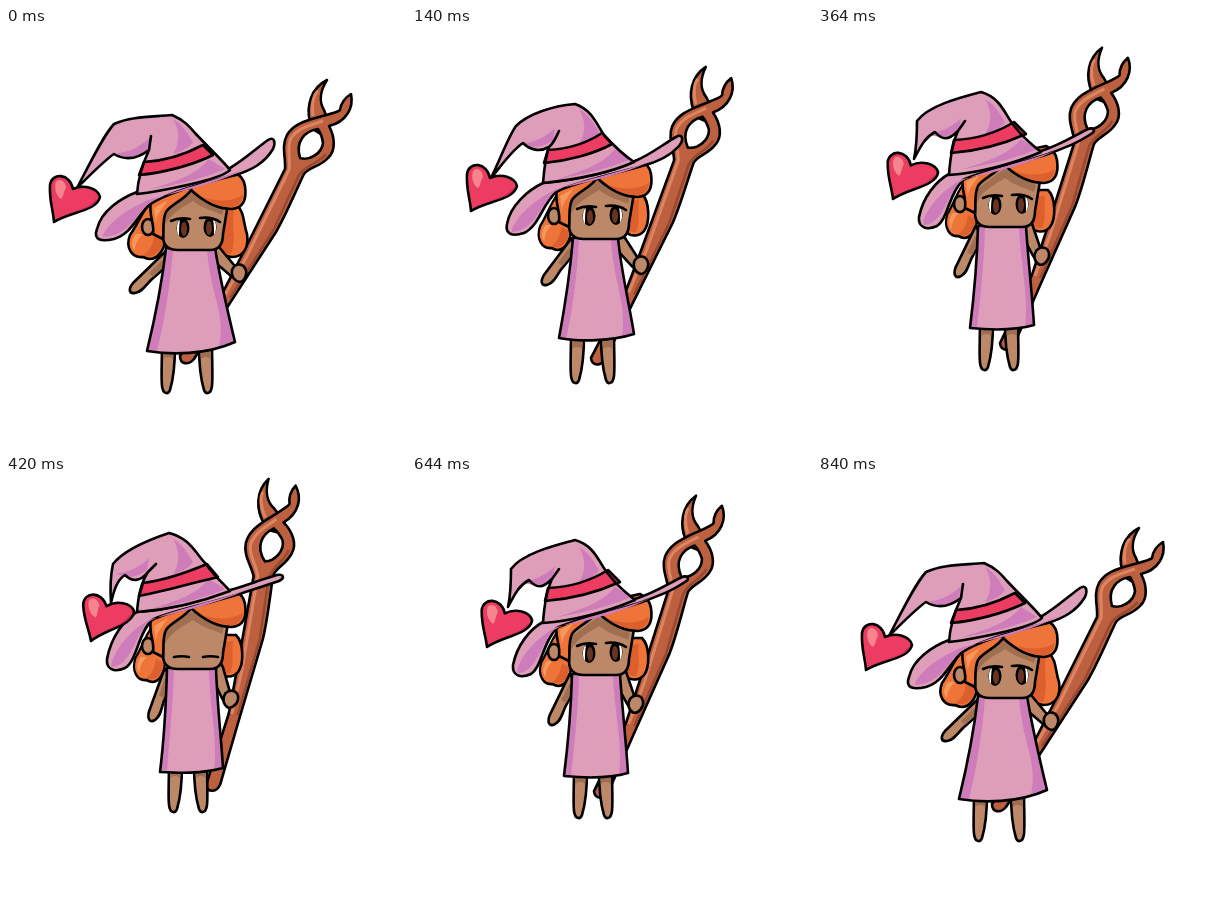
Animation, 400 px wide and 420 px high, one loop 0.98 s. Source, as an HTML page without scripts:

```html
<!DOCTYPE html>
<html lang="en">
<head>
<meta charset="utf-8">
<title>Little witch</title>
<style>
html, body { margin: 0; width: 100%; height: 100%; overflow: hidden; background: #fff; }
svg { display: block; width: 400px; height: 420px; }
.ink { stroke: #000; stroke-width: 2.6; stroke-linejoin: round; stroke-linecap: round; }
.line { fill: none; }
.skin { fill: #bd8868; }
.skin-dark { fill: #a06e50; }
.hair { fill: #ef7439; }
.hair-lit { fill: #f6975b; }
.hair-dark { fill: #dc5f2d; }
.cloth { fill: #de9eb9; }
.cloth-dark { fill: #cf7cba; }
.red { fill: #ec3c62; }
.wood { fill: #bd6040; }

.pose { visibility: hidden; animation: .98s step-end infinite; }
.low { animation-name: low; }
.mid { animation-name: mid; }
.high { animation-name: high; }
.top { animation-name: top; }
@keyframes low { 0%, 85.7142% { visibility: visible } 14.2857% { visibility: hidden } }
@keyframes mid { 0%, 28.5714%, 85.7142% { visibility: hidden } 14.2857%, 71.4285% { visibility: visible } }
@keyframes high { 0%, 42.8571%, 71.4285% { visibility: hidden } 28.5714%, 57.1428% { visibility: visible } }
@keyframes top { 0%, 57.1428% { visibility: hidden } 42.8571% { visibility: visible } }
</style>
</head>
<body>
<svg viewBox="0 0 400 420">
<defs>
  <!-- staff: origin at the eye of the fork -->
  <g id="staff" transform="translate(-308 -115)">
    <path class="ink wood" d="M304 94C300 78 305 60 321 52C314 63 313 74 318 82L324 98L318 108L308 102Z"/>
    <path class="ink wood" fill-rule="evenodd" d="M345 66C348 80 340 94 323 98C329 109 330 123 322 130C314 139 303 139 298 146C291 160 281 185 270 204L222 278L188 331C182 338 174 336 174 328L216 266L237 225L279 141C280 130 275 118 281 107C287 97 297 94 306 91C319 87 331 85 334 82C335 75 340 69 345 66ZM312 101C299 103 289 113 294 130C304 133 316 125 317 115C316 108 314 104 312 101Z"/>
    <path class="line" stroke="#dc8562" stroke-width="3" d="M219 267L241 228L283 142C285 129 280 120 285 110C292 100 302 98 317 93M307 88C305 76 308 66 312 63"/>
    <path class="line" stroke="#984831" stroke-width="2.5" d="M224 270L267 203L293 147C300 137 312 136 320 126"/>
  </g>

  <g id="leg">
    <path class="ink skin" d="M-4 -48C-4 -32 -5 -16 -4 -7C-3 1 2 2 4 -3C8 -16 9 -30 9 -48Z"/>
    <path class="skin-dark" d="M-3 -44H8L7 -34C3 -37 0 -36 -3 -34Z"/>
  </g>
  <!-- arms: origin at the hand -->
  <g id="arm-left">
    <path class="ink skin" d="M33 -39L0 -7C-5 -1 -4 4 2 3C9 2 12 -4 18 -10L36 -26Z"/>
    <path class="skin-dark" d="M29 -30L16 -17L20 -13L33 -25Z"/>
  </g>
  <g id="arm-right">
    <path class="ink skin" d="M-34 -36L-20 -25L-5 -7L-1 8L-8 4L-22 -8L-34 -22Z"/>
    <path class="ink skin" d="M-7 -2C-4 -9 3 -9 6 -4C9 1 6 9 1 10C-5 9 -8 4 -7 -2Z"/>
  </g>

  <g id="hair-left">
    <path class="ink hair" d="M145 174C135 185 131 198 124 207C119 220 126 230 137 229C146 234 154 229 158 218L162 180Z"/>
    <path class="hair-dark" d="M137 227C144 223 147 216 148 208L157 212C155 226 146 231 137 227Z"/>
    <path class="hair-lit" d="M130 206C125 213 125 219 129 222C129 215 133 210 137 206Z"/>
  </g>
  <g id="hair-right">
    <path class="ink hair" d="M230 176C239 184 237 195 241 206C243 219 238 229 226 229C218 229 214 224 212 218L216 178Z"/>
    <path class="hair-dark" d="M218 184L228 182C225 196 231 212 225 226C218 226 215 220 214 216Z"/>
  </g>
  <g id="locks">
    <path class="ink hair" d="M230 176C238 184 238 205 232 213C226 220 217 218 213 213L216 176Z"/>
    <path class="hair-dark" d="M218 183L227 182C225 193 229 204 224 214C218 215 215 211 214 207Z"/>
  </g>

  <g id="face">
    <ellipse class="ink skin" cx="142" cy="199" rx="6" ry="8"/>
    <path class="ink skin" d="M157 180V208C157 217 162 222 172 222H204C213 222 217 216 217 206L222 176L186 160Z"/>
    <path class="skin-dark" d="M186 164L159 184V197C165 184 180 178 187 173C197 181 211 184 216 187L218 180Z"/>
  </g>
  <g id="fringe">
    <path class="ink hair" d="M187 160C179 172 165 176 160 184C156 192 158 203 157 211L147 206C149 195 142 188 145 172L165 160Z"/>
    <path class="hair-lit" d="M148 180L162 172L153 185C150 190 150 194 150 196Z"/>
    <path class="ink hair" d="M185 162C198 174 212 181 226 181C237 180 241 172 239 158C238 151 234 147 228 144L186 153Z"/>
    <path class="hair-dark" d="M196 169C210 174 226 174 237 167C236 176 230 180 222 179C212 178 204 175 196 169Z"/>
  </g>
  <g id="eye">
    <ellipse cx="0" cy="0" rx="6.5" ry="10"/>
    <path fill="#fff" d="M-5 -6C-7 0 -6 5 -4 8C-4 3 -4 -3 -3 -8Z"/>
    <ellipse cx="1" cy="1" rx="3" ry="7" fill="#693522"/>
  </g>
  <g id="eyes">
    <use href="#eye" x="177" y="200"/>
    <use href="#eye" transform="translate(204 199) scale(-1 1)"/>
    <path class="ink line" stroke-width="2" d="M165 193C171 190 178 190 184 191M194 190C201 189 208 190 214 194"/>
  </g>
  <path id="shut" class="ink line" d="M168 210C173 209 178 209 183 210M197 210C202 209 207 209 212 210"/>

  <!-- heart: origin at its point -->
  <g id="heart">
    <path class="ink red" d="M0 0C-1 -13 -5 -22 -4 -37C-2 -50 16 -49 19 -33C30 -38 44 -34 46 -25C43 -11 15 -10 0 0Z"/>
    <path fill="#f5848f" d="M2 -40C6 -45 12 -40 12 -34C9 -30 10 -26 7 -23C2 -26 0 -34 2 -40Z"/>
    <path fill="#cf2857" d="M3 -4C18 -11 34 -12 42 -23C43 -13 17 -11 3 -4Z"/>
  </g>
  <g id="folds" class="cloth-dark">
    <path d="M111 125C123 125 135 118 143 110L141 122C130 130 118 131 111 125Z"/>
    <path d="M167 91C179 98 182 107 187 114C183 120 175 124 167 126C175 114 173 101 167 91Z"/>
    <path d="M203 131L219 141C200 150 165 158 145 161C171 153 191 146 203 131Z"/>
  </g>
</defs>

<g class="pose low">
  <use href="#staff" transform="translate(308 115)"/>
  <use href="#leg" x="160" y="365"/>
  <use href="#leg" transform="translate(202 365) scale(-1 1)"/>
  <use href="#hair-left"/>
  <use href="#hair-right"/>
  <use href="#arm-left" x="127" y="262"/>
  <use href="#arm-right" x="233" y="244"/>
  <path class="cloth" d="M160 220H209C214 250 222 285 229 314C200 327 165 327 141 323C149 290 156 255 160 220Z"/>
  <path class="cloth-dark" d="M160 222H167C164 260 158 295 151 323L142 322C150 290 157 255 160 222ZM201 222H208L228 313L213 319C220 285 205 270 201 222Z"/>
  <path class="ink line" d="M160 220H209C214 250 222 285 229 314C200 327 165 327 141 323C149 290 156 255 160 220Z"/>
  <use href="#face"/>
  <use href="#eyes"/>
  <use href="#fringe"/>
  <path class="ink cloth" d="M224 140C238 132 252 119 262 112C268 108 270 114 267 121C258 136 245 142 230 147C200 154 160 165 143 177C130 190 125 206 108 211C95 214 87 212 91 201C95 183 115 170 131 164C165 161 200 152 224 140Z"/>
  <path class="cloth-dark" d="M97 207C106 190 128 178 145 171C175 163 215 155 240 140C215 152 160 163 142 176C129 188 122 208 97 209Z"/>
  <path class="cloth" d="M71 160C84 135 97 108 108 96C125 88 148 89 166 87C178 92 184 99 189 105C205 122 218 134 224 142C215 152 150 164 131 166C132 150 137 135 143 122C130 132 118 132 108 126C100 131 85 146 71 160Z"/>
  <use href="#folds"/>
  <path class="ink red" d="M138 134C158 133 178 127 197 117L207 127C185 138 155 145 133 147Z"/>
  <path class="ink line" d="M71 160C84 135 97 108 108 96C125 88 148 89 166 87C178 92 184 99 189 105C205 122 218 134 224 142C215 152 150 164 131 166C132 150 137 135 143 122C130 132 118 132 108 126C100 131 85 146 71 160ZM143 122L145 108"/>
  <use href="#heart" x="48" y="194"/>
</g>

<g class="pose mid">
  <use href="#staff" transform="translate(288 103) rotate(-6.5)"/>
  <use href="#leg" x="163" y="355"/>
  <use href="#leg" transform="translate(198 355) scale(-1 1)"/>
  <use href="#hair-left" transform="matrix(.88 0 0 1 19 -9)"/>
  <use href="#locks" y="-10"/>
  <use href="#arm-left" transform="translate(133 254) rotate(-9)"/>
  <use href="#arm-right" transform="translate(229 236) rotate(7)"/>
  <path class="cloth" d="M161 210H206C209 242 217 275 222 306C200 313 168 314 147 310C153 278 158 245 161 210Z"/>
  <path class="cloth-dark" d="M161 212H167C165 250 160 285 154 311L148 309C154 278 159 245 161 212ZM199 212H205L221 305L210 309C215 275 202 258 199 212Z"/>
  <path class="ink line" d="M161 210H206C209 242 217 275 222 306C200 313 168 314 147 310C153 278 158 245 161 210Z"/>
  <use href="#face" y="-11"/>
  <use href="#eyes" y="-12"/>
  <use href="#fringe" y="-12"/>
  <path class="ink cloth" d="M223 133C238 127 253 115 264 109C271 105 272 112 267 118C258 128 246 134 230 138C198 147 160 155 144 164C130 177 127 198 112 205C100 209 93 206 95 196C98 178 116 162 131 155C165 152 200 144 223 133Z"/>
  <path class="cloth-dark" d="M100 201C108 183 128 169 145 161C175 154 215 146 240 132C215 144 160 153 142 164C129 177 122 203 100 204Z"/>
  <path class="cloth" d="M79 150C88 132 96 109 104 98C116 86 140 78 163 76C180 82 184 95 192 107C203 119 216 130 222 134C195 146 160 152 131 155C132 143 133 130 137 119C130 123 120 124 111 115C100 122 90 137 79 150Z"/>
  <use href="#folds" y="-10"/>
  <path class="ink red" d="M136 122C156 121 175 115 190 105L200 116C182 126 155 133 132 135Z"/>
  <path class="ink line" d="M79 150C88 132 96 109 104 98C116 86 140 78 163 76C180 82 184 95 192 107C203 119 216 130 222 134C195 146 160 152 131 155C132 143 133 130 137 119C130 123 120 124 111 115C100 122 90 137 79 150ZM137 119C142 115 144 109 147 103"/>
  <use href="#heart" x="59" y="183"/>
</g>

<g class="pose high">
  <use href="#staff" transform="translate(281 84) rotate(-9)"/>
  <use href="#leg" x="166" y="342"/>
  <use href="#leg" transform="translate(196 342) scale(-1 1)"/>
  <use href="#hair-left" transform="matrix(.85 0 0 1 24 -21)"/>
  <use href="#locks" y="-14"/>
  <use href="#arm-left" transform="translate(140 246) rotate(-20)"/>
  <use href="#arm-right" transform="translate(224 227) rotate(21)"/>
  <path class="cloth" d="M160 198H208C210 230 214 265 216 297C195 303 172 302 152 300C156 268 159 235 160 198Z"/>
  <path class="cloth-dark" d="M160 200H167C166 236 162 272 159 300L153 299C157 268 159 235 160 200ZM201 200H207L215 296L207 299C211 270 203 240 201 200Z"/>
  <path class="ink line" d="M160 198H208C210 230 214 265 216 297C195 303 172 302 152 300C156 268 159 235 160 198Z"/>
  <use href="#face" y="-23"/>
  <use href="#eyes" y="-23"/>
  <use href="#fringe" y="-26"/>
  <path class="ink cloth" d="M223 123C240 118 256 108 270 101C276 99 278 103 273 106C258 116 246 120 230 126C198 137 160 144 145 152C131 165 130 191 119 198C108 203 100 199 101 189C105 169 118 153 131 146C165 144 200 133 223 123Z"/>
  <path class="cloth-dark" d="M105 194C111 175 129 159 145 151C175 145 215 135 240 121C215 133 160 143 142 154C129 167 125 196 106 197Z"/>
  <path class="cloth" d="M96 131C99 117 99 99 99 93C110 78 140 70 163 64C184 70 187 88 197 99C207 112 216 118 223 124C195 136 160 145 131 147C132 132 134 116 140 103C130 113 124 112 117 104C106 110 102 120 96 131Z"/>
  <use href="#folds" y="-20"/>
  <path class="ink red" d="M136 112C160 111 180 104 196 94L208 106C188 115 160 123 133 125Z"/>
  <path class="ink line" d="M96 131C99 117 99 99 99 93C110 78 140 70 163 64C184 70 187 88 197 99C207 112 216 118 223 124C195 136 160 145 131 147C132 132 134 116 140 103C130 113 124 112 117 104C106 110 102 120 96 131ZM140 103L147 93"/>
  <use href="#heart" transform="translate(75 171) rotate(-2)"/>
</g>

<g class="pose top">
  <use href="#staff" transform="translate(268 67) rotate(-16.5)"/>
  <use href="#leg" x="167" y="336"/>
  <use href="#leg" transform="translate(197 336) scale(-1 1)"/>
  <use href="#hair-left" transform="matrix(.85 0 0 1 24 -25)"/>
  <use href="#locks" y="-17"/>
  <use href="#arm-left" transform="translate(146 242) rotate(-26)"/>
  <use href="#arm-right" transform="translate(225 222) rotate(24)"/>
  <path class="cloth" d="M161 192H210C211 225 215 260 217 292C195 298 173 297 154 296C158 264 160 230 161 192Z"/>
  <path class="cloth-dark" d="M161 194H168C167 230 163 266 161 296L155 295C159 264 160 230 161 194ZM203 194H209L216 291L208 294C212 265 204 235 203 194Z"/>
  <path class="ink line" d="M161 192H210C211 225 215 260 217 292C195 298 173 297 154 296C158 264 160 230 161 192Z"/>
  <use href="#face" y="-29"/>
  <use href="#shut" y="-29"/>
  <use href="#fringe" y="-30"/>
  <path class="ink cloth" d="M224 114C240 110 256 103 271 99C278 98 279 102 273 105C258 110 246 114 230 119C198 129 160 136 146 144C132 157 131 185 119 192C108 197 100 193 101 183C105 161 118 144 131 136C165 134 200 124 224 114Z"/>
  <path class="cloth-dark" d="M105 189C111 168 129 151 145 143C175 136 215 126 240 114C215 124 160 135 142 146C129 159 125 190 106 191Z"/>
  <path class="cloth" d="M105 127C104 112 105 97 107 88C118 74 145 63 163 57C184 62 190 78 200 88C208 100 216 106 224 115C195 126 160 134 131 136C132 122 134 108 142 96C134 106 126 106 119 99C111 104 108 114 105 127Z"/>
  <use href="#folds" y="-28"/>
  <path class="ink red" d="M137 107C160 104 182 96 201 88L212 101C190 106 160 115 133 120Z"/>
  <path class="ink line" d="M105 127C104 112 105 97 107 88C118 74 145 63 163 57C184 62 190 78 200 88C208 100 216 106 224 115C195 126 160 134 131 136C132 122 134 108 142 96C134 106 126 106 119 99C111 104 108 114 105 127ZM142 96L150 88"/>
  <use href="#heart" transform="translate(85 165) rotate(-6)"/>
</g>
</svg>
</body>
</html>
```
